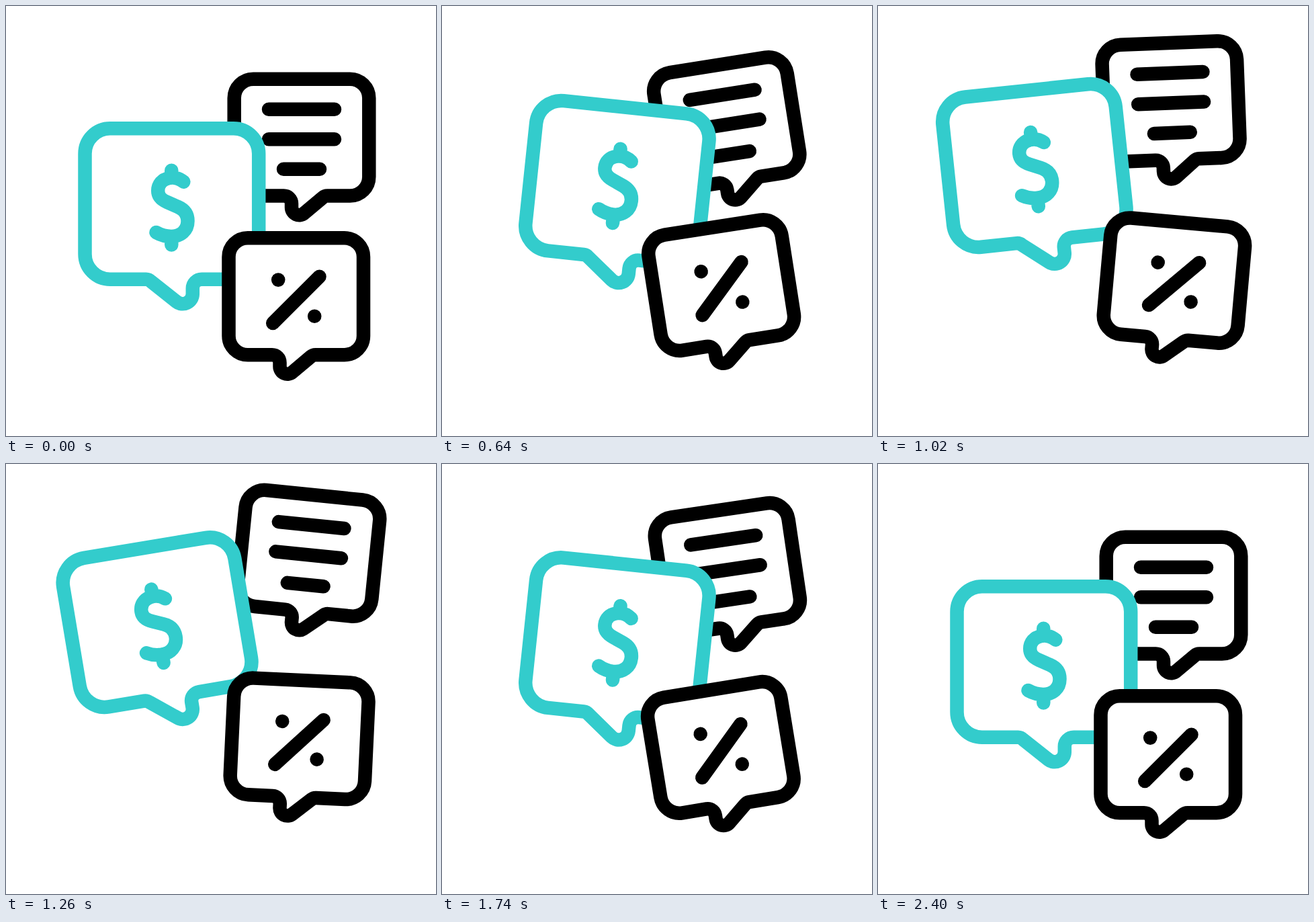
These frames come from a looping animation (640 px wide and 640 px high, 2420 ms). An HTML page without scripts:

```html
<!DOCTYPE html>
<html lang="en">
<head>
<meta charset="utf-8">
<title>Speech bubbles</title>
<style>
  html, body { margin: 0; width: 100%; height: 100%; overflow: hidden; background: #fff; }
  svg { display: block; width: 100%; height: 100%; }

  .bubble {
    --ink: #000;
    --lift: -64px;
    --first: -10deg;
    --second: 6deg;
    fill: none;
    stroke: var(--ink);
    stroke-width: 20.5;
    stroke-linecap: round;
    stroke-linejoin: round;
    animation: rise 2420ms infinite, sway 2420ms infinite;
    animation-timing-function: cubic-bezier(.3333, 0, .6667, 1);
  }
  .body { fill: #fff; }
  .dot { fill: var(--ink); stroke: none; }

  /* Each bubble swings around the tip of its tail. */
  .note { transform-origin: 436.5px 299.5px; animation-delay: 200ms; }
  .money {
    --ink: #33cccc;
    --first: 6deg;
    --second: -10deg;
    transform-origin: 263px 428.5px;
    animation-delay: 100ms;
  }
  .percent { --lift: -25.6px; transform-origin: 419px 536px; }

  @keyframes rise {
    0%, 90.909%, 100% { translate: 0 0; }
    45.4545% { translate: 0 var(--lift); }
  }
  @keyframes sway {
    0%, 90.909%, 100% { rotate: 0deg; }
    22.7273%, 68.1818% { rotate: var(--first); }
    45.4545% { rotate: var(--second); }
  }
</style>
</head>
<body>
<svg viewBox="0 0 640 640">
  <g class="bubble note">
    <path class="body" d="M413.5 282.6a11.5 11.5 0 0 1 11.5 11.5v5.5a11.4 11.4 0 0 0 18.9 8.7l27.6-23.2q3-2.5 6.5-2.5H512a28.3 28.3 0 0 0 28.3-28.3V137a28.3 28.3 0 0 0-28.3-28.3H368a28.3 28.3 0 0 0-28.3 28.3V254.3a28.3 28.3 0 0 0 28.3 28.3z"/>
    <path d="M391 153.7H489M391 198.2H489M413 242.7H467"/>
  </g>

  <g class="bubble money">
    <path class="body" d="M208.5 406.8q4 0 7.3 3.2l38 30.1a14.8 14.8 0 0 0 24-11.6v-8.2a13.5 13.5 0 0 1 13.5-13.5H338.7a37.5 37.5 0 0 0 37.5-37.5V219.8a37.5 37.5 0 0 0-37.5-37.5H155a37.5 37.5 0 0 0-37.5 37.5V369.3a37.5 37.5 0 0 0 37.5 37.5z"/>
    <path d="M264.3 261.7C258 256.5 250 254.5 243 256C232 258 226.2 266 226.2 275C226.2 284 232 288.5 240 292L256 299C265 303 270.5 310 270.5 320C270.5 334 260 343 246 343Q234 343 223.5 337M246.3 244.7V255M246.3 343V355.6"/>
  </g>

  <g class="bubble percent">
    <path class="body" d="M396 519.2a11.5 11.5 0 0 1 11.5 11.5v5.5a11.4 11.4 0 0 0 18.9 8.7l27.6-23.2q3-2.5 6.5-2.5H503.7a28.3 28.3 0 0 0 28.3-28.3V373.6a28.3 28.3 0 0 0-28.3-28.3H359.8a28.3 28.3 0 0 0-28.3 28.3V490.9a28.3 28.3 0 0 0 28.3 28.3z"/>
    <path d="M397.2 472L466.5 402.7"/>
    <circle class="dot" cx="405.2" cy="407.6" r="10.3"/>
    <circle class="dot" cx="459.2" cy="461.8" r="10.3"/>
  </g>
</svg>
</body>
</html>
```
